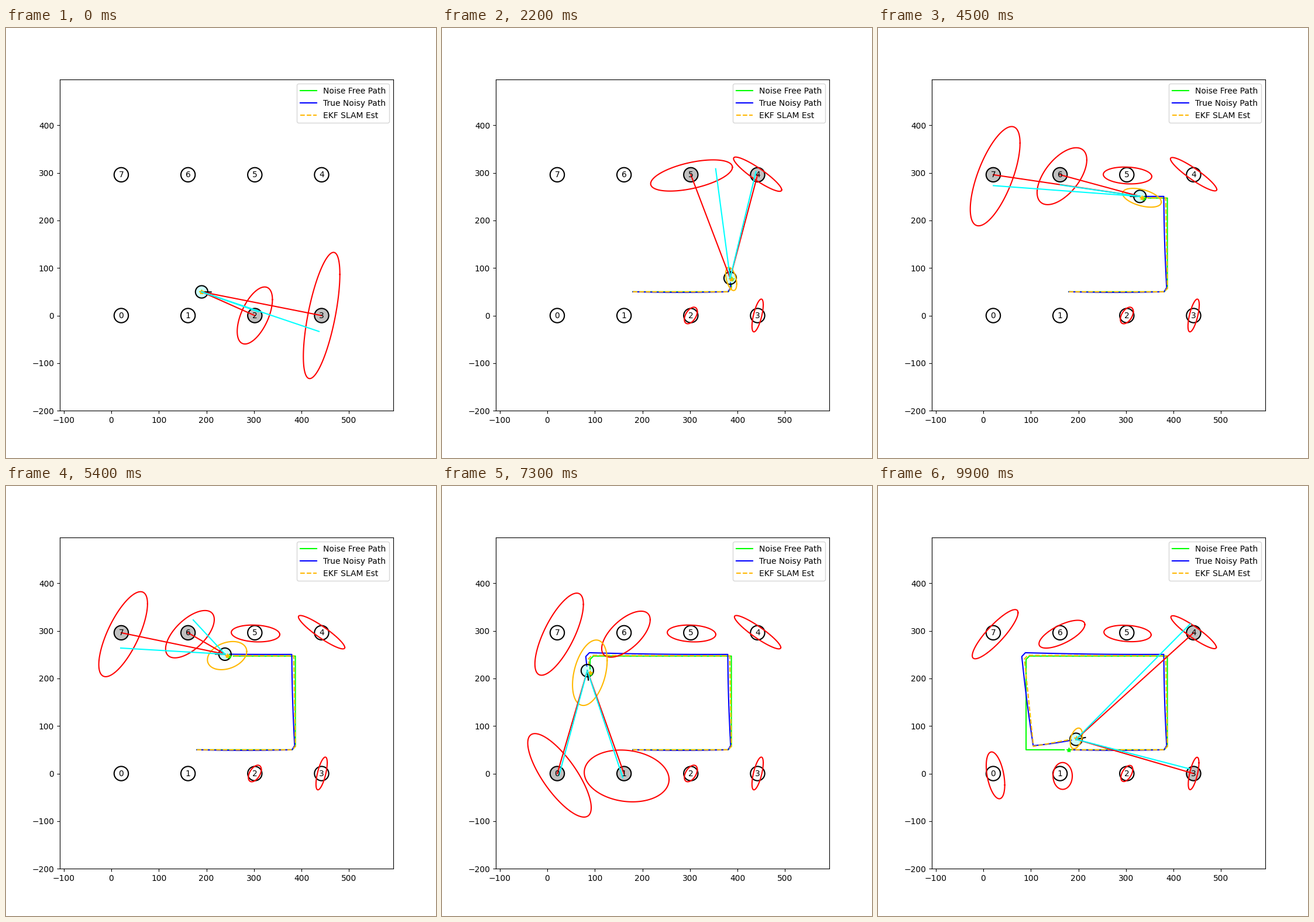
Recreate the animation shown at these times as a matplotlib script. Size 735 by 735 pixels, loop 10 s.

```python
import numpy as np
import matplotlib.pyplot as plt
from matplotlib.animation import FuncAnimation
from matplotlib.patches import Circle

FRAMES = 100
SCALE = 0.8131                          # pixels per map unit
GOLD = "#ffb800"
SIGMA_STEP, SIGMA_TURN = 0.8, np.radians(1)
SIGMA_RANGE, SIGMA_BEARING = 9.5, np.radians(10)

column = 21 + 140.4 * np.arange(4)
MARKS = np.array([(x, 0) for x in column] + [(x, 296) for x in column[::-1]])
N = len(MARKS)

# Steps at which the robot reaches each corner of its lap
CORNERS = (0, 20, 21, 40, 41, 70, 71, 90, 91, 100)


def lap(points, bow=0):
    """One position per step; each leg sags by `bow` across its direction."""
    path = [np.array(points[0], float)]
    for a, b, p, q in zip(CORNERS, CORNERS[1:], points, points[1:]):
        p, q = np.array(p, float), np.array(q, float)
        across = np.argmin(np.abs(q - p))
        for u in np.arange(1, b - a + 1) / (b - a):
            pos = p + (q - p) * u
            pos[across] -= bow * np.sin(np.pi * u)
            path.append(pos)
    return np.array(path)


ideal = lap([(180, 50), (380, 50), (387, 57), (387, 247), (387, 247),
             (97, 247), (90, 240), (90, 50), (90, 50), (180, 50)])
true = lap([(180, 50), (380, 50), (385.5, 58.5), (379.5, 250.5),
            (379.5, 250.5), (88.5, 254), (81, 246), (105, 58.5),
            (105, 58.5), (195, 72)], bow=1.2)
guess = lap([(180, 50), (380, 50), (387, 57), (383.5, 247.5),
             (383.5, 247.5), (93.5, 248.5), (86.5, 241), (105.5, 57),
             (105.5, 57), (195.5, 74)])


def heading(k):
    d = true[k] - true[k - 1]
    if not d.any():                     # turning on the spot
        d = true[k + 1] - true[k]
    return np.arctan2(d[1], d[0])


def in_view(k):
    """The two landmarks closest to the line of sight."""
    dx, dy = (MARKS - true[k]).T
    off = np.angle(np.exp(1j * (np.arctan2(dy, dx) - heading(k))))
    return sorted(np.argsort(np.abs(off))[:2])


def predict(P, k):
    dx, dy = true[k] - true[k - 1]
    F = np.eye(len(P))
    F[0, 2], F[1, 2] = -dy, dx
    P = F @ P @ F.T
    a = heading(k)
    if dx or dy:
        along = np.array([np.cos(a), np.sin(a)])
        P[:2, :2] += SIGMA_STEP ** 2 * np.outer(along, along)
    P[2, 2] += SIGMA_TURN ** 2
    return P


def update(P, k, i):
    dx, dy = MARKS[i] - true[k]
    r = np.hypot(dx, dy)
    away = np.array([[dx / r, dy / r], [-dy / r ** 2, dx / r ** 2]])
    H = np.zeros((2, len(P)))
    H[:, :2] = -away
    H[1, 2] = -1
    H[:, 3 + 2 * i:5 + 2 * i] = away
    R = np.diag([SIGMA_RANGE ** 2, SIGMA_BEARING ** 2])
    K = P @ H.T @ np.linalg.inv(H @ P @ H.T + R)
    P = P - K @ H @ P
    return (P + P.T) / 2


def run_filter():
    """Covariance of pose and map after every step."""
    P = np.diag([0.0] * 3 + [1e6] * (2 * N))
    history = [P]
    for k in range(1, FRAMES + 1):
        P = predict(P, k)
        for i in seen[k]:
            P = update(P, k, i)
        history.append(P)
    return history


seen = [[]] + [in_view(k) for k in range(1, FRAMES + 1)]
first = [next((k for k, s in enumerate(seen) if i in s), FRAMES + 1)
         for i in range(N)]
cov = run_filter()
theta = np.linspace(0, 2 * np.pi, 121)


def ellipse(center, C):
    """Three sigma outline."""
    w, h = np.sqrt(np.diag(C))
    rho = C[0, 1] / (w * h)
    x = 3 * w * np.cos(theta)
    y = 3 * h * (rho * np.cos(theta)
                 + np.sqrt(max(0, 1 - rho ** 2)) * np.sin(theta))
    return center[0] + x, center[1] + y


def readings(k):
    rng = np.random.default_rng(k)
    for i in seen[k]:
        dx, dy = MARKS[i] - true[k]
        r = np.hypot(dx, dy) + rng.normal(0, 10)
        a = np.arctan2(dy, dx) + rng.normal(0, 0.1)
        yield true[k] + r * np.array([np.cos(a), np.sin(a)])


fig, ax = plt.subplots(figsize=(7.35, 7.35), dpi=100)
half = 0.775 * 735 / SCALE / 2
ax.set_xlim(242 - half, 242 + half)
ax.set_ylim(-200, -200 + 0.77 * 735 / SCALE)
ax.set_xticks(range(-100, 501, 100))
ax.set_yticks(range(-200, 401, 100))


def line(color, z, style="-", **kw):
    return ax.plot([], [], style, color=color, zorder=z, **kw)[0]


paths = [(line("lime", 2, label="Noise Free Path"), ideal),
         (line("blue", 2, label="True Noisy Path"), true),
         (line(GOLD, 2, "--", label="EKF SLAM Est"), guess)]
ax.legend(loc="upper right")

discs = []
for i, (x, y) in enumerate(MARKS):
    discs.append(ax.add_patch(Circle((x, y), 15, fc="none", ec="black",
                                     lw=1.5, zorder=1)))
    ax.text(x, y, str(i), ha="center", va="center", zorder=3)

robot = ax.add_patch(Circle((0, 0), 13, fc=(0, 1, 1, .2), ec="black",
                            lw=1.5, zorder=2.1))
nose = line("black", 2.2)
stars = [(line("lime", 2.3, "*"), ideal), (line(GOLD, 2.4, "*"), guess)]
rings = [line("red", 2.5) for _ in MARKS]
pose_ring = line(GOLD, 2.5)
sights = [line("red", 2.6) for _ in range(2)]
beams = [line("cyan", 2.7) for _ in range(2)]


def segment(artist, a, b):
    artist.set_data([a[0], b[0]], [a[1], b[1]])


def draw(f):
    k = f + 1
    here = true[k]
    for artist, pts in paths:
        artist.set_data(*pts[:k].T)
    for artist, pts in stars:
        artist.set_data(*pts[k:k + 1].T)

    robot.center = tuple(here)
    a = heading(k)
    segment(nose, here, here + 20 * np.array([np.cos(a), np.sin(a)]))
    pose_ring.set_data(*ellipse(guess[k], cov[k][:2, :2]))

    for i, (disc, ring) in enumerate(zip(discs, rings)):
        disc.set_facecolor("#c0c0c0" if i in seen[k] else "none")
        if k < first[i]:
            ring.set_data([], [])
            continue
        # a landmark inherits the pose error of its first sighting
        shift = guess[first[i]] - true[first[i]]
        block = slice(3 + 2 * i, 5 + 2 * i)
        ring.set_data(*ellipse(MARKS[i] + shift, cov[k][block, block]))

    for i, sight, beam, hit in zip(seen[k], sights, beams, readings(k)):
        segment(sight, here, MARKS[i])
        segment(beam, here, hit)
    return []


anim = FuncAnimation(fig, draw, frames=FRAMES, interval=100, repeat=True,
                     repeat_delay=0)
plt.show()
```
